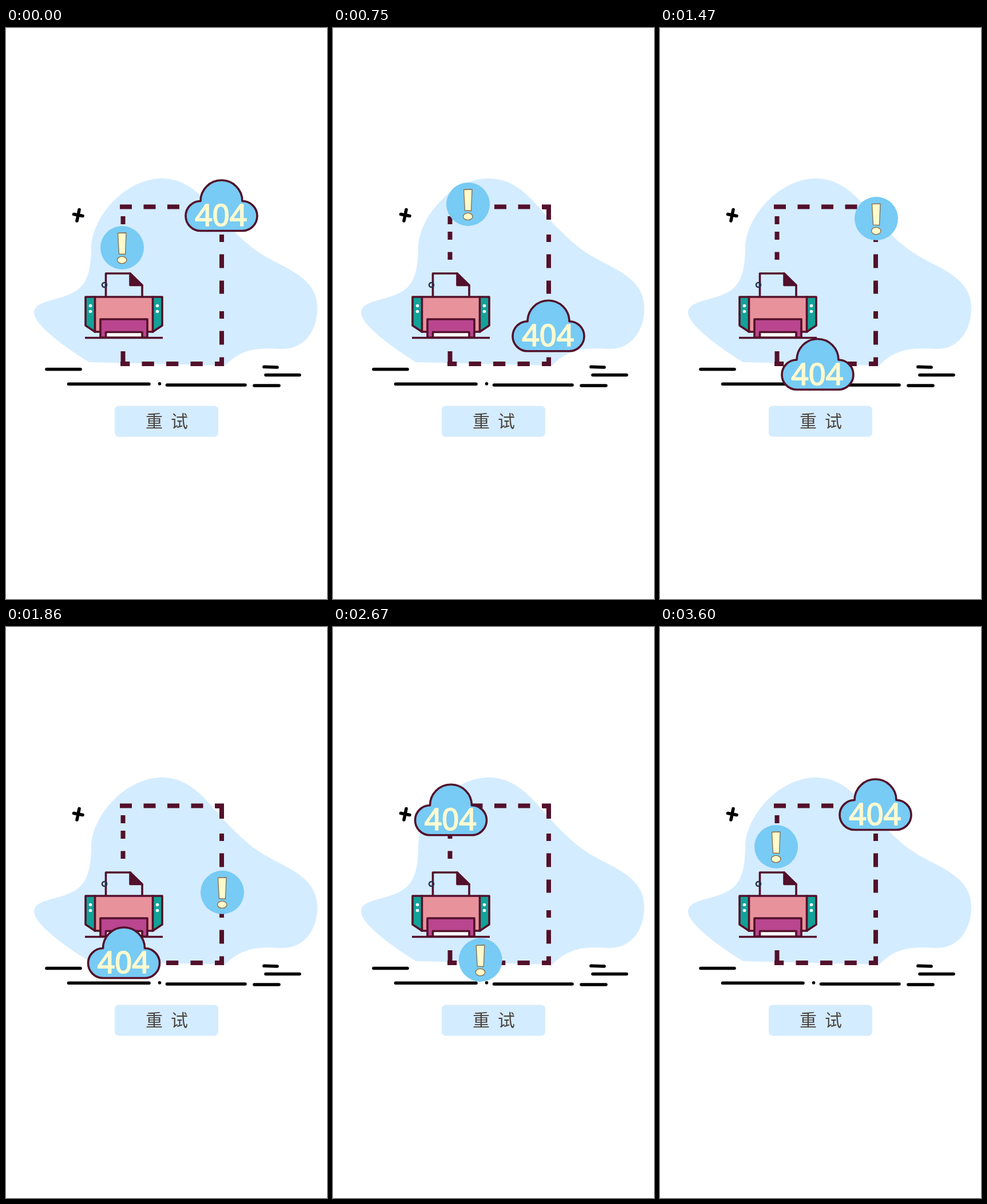
An HTML page for the animation above (3.63 s loop, 561 by 998 pixels).

```html
<!DOCTYPE html>
<html lang="zh-CN">
<head>
<meta charset="utf-8">
<title>404</title>
<style>
  html, body { margin: 0; width: 100%; height: 100%; overflow: hidden; background: #fff; }
  svg { display: block; }
  .ink { stroke: #53102a; stroke-width: 3.6; stroke-linejoin: round; }
  .track { fill: none; stroke: #53102a; stroke-width: 8; stroke-linejoin: round; }
  .ground { stroke: #000; stroke-width: 5.6; stroke-linecap: round; }
  .sky { fill: #77cbf4; }
  .code { font: 53px "Noto Sans", sans-serif; text-anchor: middle; fill: #fffacf; stroke: #fffacf; stroke-width: 1.7; }
  .retry { font: 30px "Noto Sans CJK SC", "Noto Sans CJK", sans-serif; fill: #4a443f; }
</style>
</head>
<body>
<svg width="561" height="998" viewBox="0 0 561 998">
  <path fill="#d4ecff" d="M145 584C108 561 49 520 49 497C49 482 72 478 92 472C132 461 148 446 149 385C149 332 207 263 273 263C330 263 360 318 395 352C425 382 440 393 475 411C512 430 544 448 544 490C544 530 520 563 480 561C440 559 412 560 383 590Z"/>

  <g class="track">
    <path d="M199 312.5H381" stroke-dasharray="21 20.5"/>
    <path d="M381 587H200" stroke-dasharray="21.3 21.2" stroke-dashoffset="5.3"/>
    <path d="M377 361V591" stroke-dasharray="13 21.5 24 22 23 30.5"/>
    <path d="M366 313H377V335M204.5 329v14m0 13v14m0 21.5v13.500M204.5 565V587H215"/>
  </g>

  <path class="ground" d="M71 596.500H130M109.500 622.300H250M268.500 621.700h.01M281.500 624H418M434 625H477M454 606.500H513M451 592.300L474 593"/>
  <path class="ground" d="M128 317.500l-4 19.500M118.500 325.500l15.500 3"/>

  <!-- printer, centred on x = 206 -->
  <g class="ink" transform="translate(206 0)">
    <path fill="none" d="M-31.500 470V429H11L32 450V470"/>
    <path fill="#53102a" d="M11 429V449.500H32Z"/>
    <circle cx="-34" cy="449" r="4" fill="none" stroke="#24324f" stroke-width="2.6"/>
    <path fill="#e8929c" d="M-51 470H51V531H-51Z"/>
    <g id="panel">
      <path fill="#12a298" d="M-67 470H-50.500V531L-67 520Z"/>
      <path stroke="#fff" stroke-width="5.6" stroke-linecap="round" d="M-58.500 485.500h.01m0 10h.01"/>
    </g>
    <use href="#panel" transform="scale(-1 1)"/>
    <path fill="#b9468f" d="M-41 541V509H41V541Z"/>
    <path fill="#fff" d="M-31.500 541V531.500H32V541Z"/>
    <path d="M-68 541.500H68"/>
  </g>

  <rect x="190" y="660.5" width="181" height="54" rx="7" fill="#d4ecff"/>
  <text class="retry" x="244 288" y="698">重试</text>

  <g id="alert">
    <circle class="sky" r="38"/>
    <g fill="#fffacb" stroke="#8b6b45" stroke-width="1.3" stroke-linejoin="round">
      <path d="M-7.500 -25.500L7 -26L5.500 11.500L-5.500 11Z"/>
      <ellipse cx="-.3" cy="21.5" rx="8.2" ry="6.2"/>
    </g>
  </g>

  <g id="cloud">
    <path class="ink sky" d="M-36.500 -7.500a36.500 36.500 0 0 1 73 0a26 26 0 0 1 0 52h-73a26 26 0 0 1 0 -52Z"/>
    <text class="code" x="-.8" y="36">404</text>
  </g>
</svg>
<script>
  const LOOP = 3630, STEP = 30;

  // Both parts circle a box clockwise at constant speed per side.
  const corners = (left, top, right, bottom) => [[right, top], [right, bottom], [left, bottom], [left, top]];

  const [cloudStart, ...cloudRest] = corners(206, 310, 376.5, 587.5);
  const [topRight, bottomRight, bottomLeft, topLeft] = corners(203, 308, 378, 582);
  const alertStart = [203, 384];

  const routes = {
    cloud: { points: [cloudStart, ...cloudRest, cloudStart], times: [0, 990, 1800, 2700, 3600] },
    alert: {
      points: [alertStart, topLeft, topRight, bottomRight, bottomLeft, alertStart],
      times: [0, 600, 1395, 2213, 2878, 3600],
    },
  };

  function positionAt({ points, times }, t) {
    const i = Math.max(1, times.findIndex(time => t <= time));
    const k = (t - times[i - 1]) / (times[i] - times[i - 1]);
    return points[i].map((end, axis) => points[i - 1][axis] * (1 - k) + end * k);
  }

  function draw() {
    const t = Math.floor(performance.now() % LOOP / STEP) * STEP;
    for (const id in routes)
      document.getElementById(id).setAttribute("transform", `translate(${positionAt(routes[id], t)})`);
    requestAnimationFrame(draw);
  }
  draw();
</script>
</body>
</html>
```
